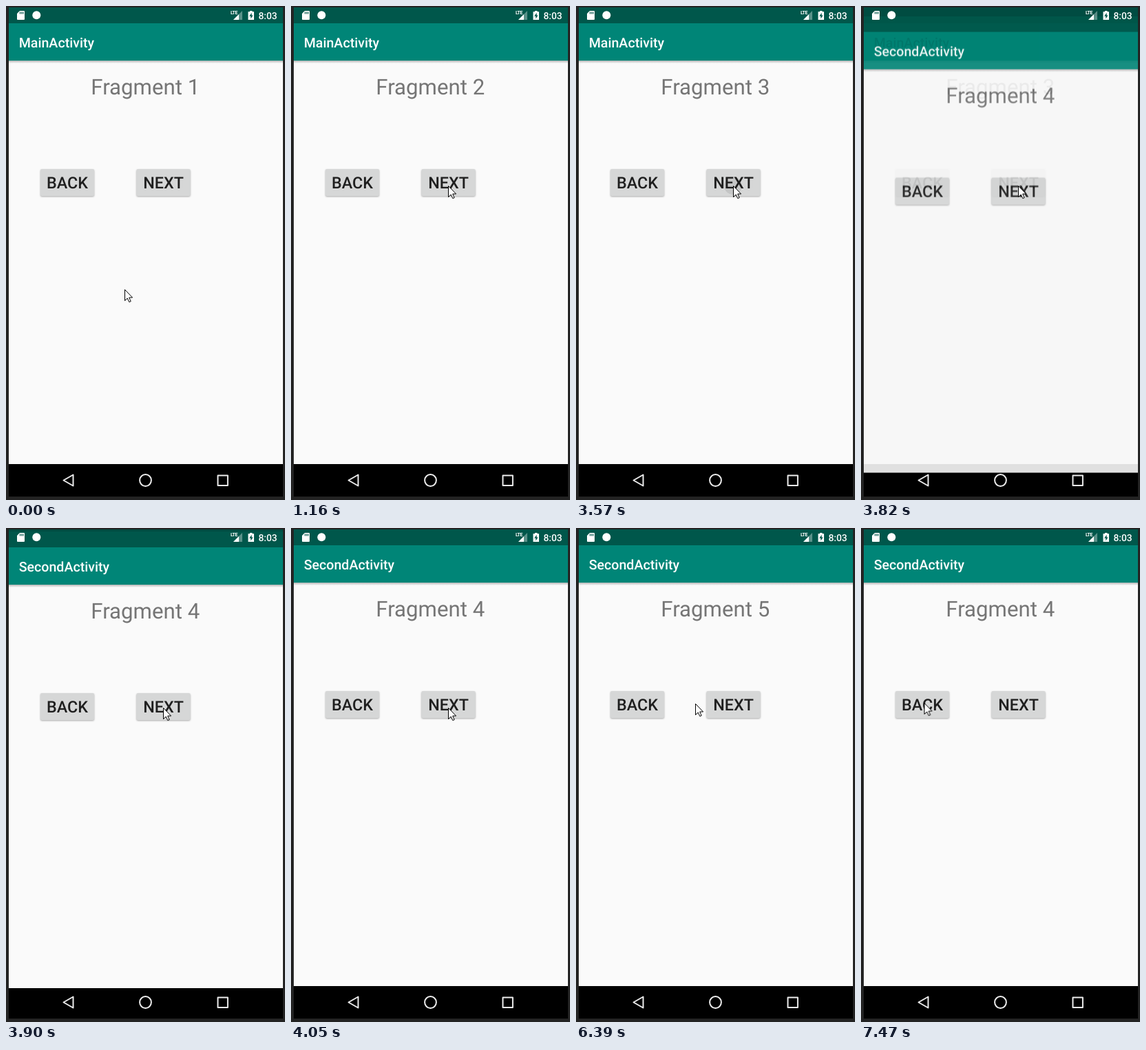
These frames come from a looping animation (405x715 px, 8000 ms). An HTML page:

```html
<!DOCTYPE html>
<html lang="en">
<head>
<meta charset="utf-8">
<title>Fragment navigation</title>
<style>
html, body { margin: 0; width: 100%; height: 100%; overflow: hidden; background: #232323; }
svg { display: block; width: 405px; height: 715px; font-family: Roboto, sans-serif; text-rendering: geometricPrecision; }

.bar-title { font-size: 19.6px; font-weight: 500; fill: #fff; }
.heading { font-size: 31.2px; fill: #757575; }
.label { font-size: 23.3px; font-weight: 500; fill: #1f1f1f; text-anchor: middle; }
.key { fill: #d6d7d7; filter: drop-shadow(0 1px 1px rgba(0, 0, 0, .32)); }
.nav { fill: none; stroke: #ececec; stroke-width: 2; stroke-linejoin: round; }

.anim { animation: 8s step-end infinite; }
.one { animation-name: one; }
.two { animation-name: two; }
.three { animation-name: three; }
.four { animation-name: four; }
.five { animation-name: five; }
.second { animation-name: enter; }
.dim { animation-name: dim; }
.ghost { animation-name: ghost; }
.next-ripple { animation-name: next-ripple; transform-origin: 228px 260px; }
.back-ripple { animation-name: back-ripple; transform-origin: 92px 253px; }
.cursor { animation-name: move; }

@keyframes one { 0% { opacity: 1 } 14.49%, 100% { opacity: 0 } }
@keyframes two { 0% { opacity: 0 } 14.49% { opacity: 1 } 28.99%, 100% { opacity: 0 } }
@keyframes three { 0% { opacity: 0 } 28.99%, 100% { opacity: 1 } }
@keyframes four { 0% { opacity: 1 } 69.11% { opacity: 0 } 93.36%, 100% { opacity: 1 } }
@keyframes five { 0% { opacity: 0 } 69.11% { opacity: 1 } 93.36%, 100% { opacity: 0 } }

/* The second screen rises and fades in over the dimmed first one. */
@keyframes enter {
  0% { opacity: 0; transform: translateY(12.5px) }
  47.74% { opacity: .9; transform: translateY(12.5px) }
  48.74% { opacity: 1; transform: translateY(3px) }
  49.74% { opacity: 1; transform: translateY(1px) }
  50.61%, 100% { opacity: 1; transform: none }
}
@keyframes dim { 0% { opacity: 0 } 47.74%, 100% { opacity: .12 } }
@keyframes ghost { 0% { fill: #fff } 47.74%, 100% { fill: #000 } }

@keyframes next-ripple {
  0% { opacity: 0; transform: scale(.3) }
  12.49% { opacity: .08; transform: scale(.3) }
  14.49% { opacity: 0; transform: scale(.35) }
  27.11% { opacity: .08; transform: scale(.35) }
  28.05% { opacity: .08; transform: scale(1) }
  28.99% { opacity: 0; transform: scale(.35) }
  43.74% { opacity: .08; transform: scale(.35) }
  44.74% { opacity: .08; transform: scale(1) }
  45.74% { opacity: 0; transform: scale(.35) }
  67.24% { opacity: .08; transform: scale(.35) }
  68.18% { opacity: .08; transform: scale(1) }
  69.11%, 100% { opacity: 0; transform: scale(.35) }
}
@keyframes back-ripple {
  0% { opacity: 0; transform: scale(.35) }
  91.49% { opacity: .08; transform: scale(.35) }
  92.43% { opacity: .08; transform: scale(1) }
  93.36%, 100% { opacity: 0; transform: scale(1) }
}
@keyframes move {
  0% { transform: translate(172px, 410px) }
  3.74% { transform: translate(172px, 410px); animation-timing-function: steps(7, start) }
  10.59% { transform: translate(224px, 267px) }
  11.49% { transform: translate(228px, 260px) }
  79.86% { transform: translate(173px, 254px) }
  80.74% { transform: translate(173px, 254px); animation-timing-function: steps(5, start) }
  85.58%, 100% { transform: translate(91.5px, 253px) }
}
</style>
</head>
<body>
<svg viewBox="0 0 405 715">
  <defs>
    <linearGradient id="shade" x2="0" y2="1">
      <stop stop-opacity=".28"/>
      <stop offset="1" stop-opacity="0"/>
    </linearGradient>
    <clipPath id="keys">
      <rect x="50" y="236" width="78" height="39" rx="2"/>
      <rect x="189.5" y="236" width="78" height="39" rx="2"/>
    </clipPath>
    <g id="screen">
      <path fill="#00574b" d="M4 2H402V25H4Z"/>
      <path fill="#fafafa" d="M4 79H402V663H4Z"/>
      <path fill="#008577" d="M4 25H402V79H4Z"/>
      <rect x="4" y="79" width="398" height="4" fill="url(#shade)"/>
      <rect class="key" x="50" y="236" width="78" height="39" rx="2"/>
      <rect class="key" x="189.5" y="236" width="78" height="39" rx="2"/>
      <text class="label" x="89" y="264.4">BACK</text>
      <text class="label" x="228.5" y="264.4">NEXT</text>
    </g>
  </defs>

  <path fill="#232323" d="M0 0H405V715H0Z"/>
  <path d="M4 663H402V710H4Z"/>

  <g>
    <use href="#screen"/>
    <text class="bar-title anim ghost" x="18.7" y="59.5">MainActivity</text>
    <g class="heading">
      <text class="anim one" x="123.3" y="127.7">Fragment 1</text>
      <text class="anim two" x="123.3" y="127.7">Fragment 2</text>
      <text class="anim three" x="123.3" y="127.7">Fragment 3</text>
    </g>
    <path class="anim dim" d="M4 2H402V663H4Z"/>
  </g>

  <g class="anim second">
    <use href="#screen"/>
    <text class="bar-title" x="18.7" y="59.5">SecondActivity</text>
    <g class="heading">
      <text class="anim four" x="123.3" y="127.7">Fragment 4</text>
      <text class="anim five" x="123.3" y="127.7">Fragment 5</text>
    </g>
  </g>

  <g clip-path="url(#keys)">
    <circle class="anim next-ripple" cx="228" cy="260" r="37"/>
    <circle class="anim back-ripple" cx="92" cy="253" r="41"/>
  </g>

  <!-- Status bar -->
  <g fill="#fff">
    <path d="M20 7H26Q27 7 27 8V19Q27 20 26 20H17Q16 20 16 19V11Z"/>
    <path stroke="#00574b" stroke-width="1.2" d="M20.5 8.5V11.5M22.7 8.5V11.5M24.9 8.5V11.5"/>
    <circle cx="44.3" cy="13.2" r="6"/>
    <text x="326" y="12" font-size="7" font-weight="700" letter-spacing="-.5">LTE</text>
    <path opacity=".35" d="M343 7V20H330Z"/>
    <path d="M338 12V20H330Z"/>
    <path d="M354 7H357.5V8.3H360V20H351.5V8.3H354Z"/>
    <path fill="#00574b" d="M356.6 9.8L353.2 14.8H355.3V18.5L358.6 13.4H356.6Z"/>
    <text x="366.5" y="18.6" font-size="13.8" font-weight="500">8:03</text>
  </g>

  <!-- Navigation bar -->
  <g class="nav">
    <path d="M83.5 686.5L97.5 678.5V694.5Z"/>
    <circle cx="202.5" cy="686.5" r="8.4"/>
    <rect x="307.5" y="679.5" width="14.4" height="14.4"/>
  </g>

  <g class="anim cursor">
    <path fill="#fff" stroke="#000" d="M.5 .5V16.5L4.2 13L6.8 18.5L9.2 17.5L6.7 12H11.6Z"/>
  </g>
</svg>
</body>
</html>
```
